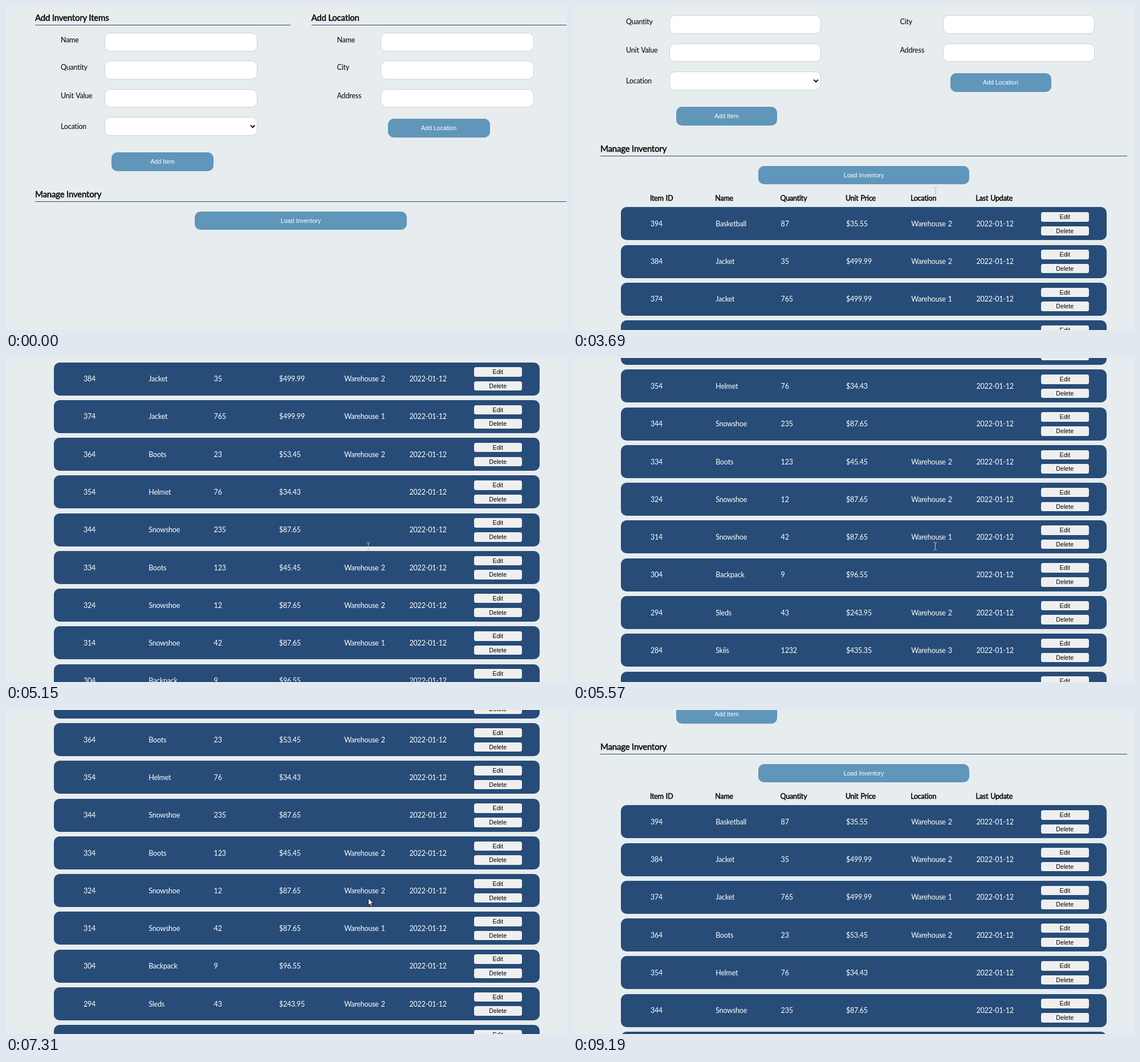
An HTML page that plays this animation: 984x569 px, repeating every 9520 ms.

```html
<!DOCTYPE html>
<html lang="en">
<head>
<meta charset="utf-8">
<title>Inventory</title>
<style>
html, body { margin: 0; width: 100%; height: 100%; overflow: hidden; background: #e7ecef; }
body { position: relative; }
#page { position: absolute; left: 0; top: 0; width: 984px; }
#page div { position: absolute; box-sizing: border-box; white-space: pre; }
.text, .head, .title { font: 12.5px/20px Lato, sans-serif; letter-spacing: -.2px; word-spacing: 1px; height: 20px; color: #000; }
.head, .title { -webkit-text-stroke: .45px #000; }
.title { font-size: 15px; word-spacing: 0; }
.cell { color: #fff; }
.line { height: 1px; background: #274c77; }
.input { background: #fff; border: 1px solid #ccd2d6; border-radius: 10px; }
.button, .small { font: 10.67px "Liberation Sans", Arial, sans-serif; text-align: center; }
.button { background: #6096ba; color: #fff; border-radius: 10px; line-height: 32px; }
.button.hover { background: #6aa5cd; }
.row { background: #274c77; border-radius: 10px; }
.small { background: #efefef; color: #000; border-radius: 3.5px; line-height: 16.5px; }
svg { position: absolute; left: 0; top: 0; overflow: visible; }
</style>
</head>
<body>
<div id="page"></div>
<svg id="cursor" width="1" height="1">
  <path id="arrow" d="M.5 .5V13L3.3 10.4 5.3 15.3 7.4 14.4 5.4 9.7H9.2Z" fill="#fff" stroke="#000" stroke-width=".9"/>
  <path id="beam" d="M-3-6.5H-1L0-5.5 1-6.5H3M0-5.5V5.5M-3 6.5H-1L0 5.5 1 6.5H3" fill="none" stroke="#cbc3ae"/>
  <g id="hand" stroke="#000" stroke-width="1" stroke-linejoin="round">
    <path d="M-1.3 1.4C-1.3-.5 1.3-.5 1.3 1.4V6.2C2-.0 0 5 2.2 5.2 3.6 5.3 3.9 6 3.9 6.9 5 5.8 6.3 6.3 6.3 7.7 7.4 7 8.2 7.6 8.2 8.8V12.5C8.2 14.5 6.7 15.3 6.7 17.5H-.3C-.3 15.3-2 14.2-3.2 12L-4.6 9.5C-5.1 8-3.4 7.6-2.5 8.7L-1.3 10.2Z" fill="#fff"/>
    <path d="M1.3 6V9.5M3.9 7V10M6.3 8V10" fill="none" stroke-width=".7"/>
  </g>
</svg>
<script>
const LOOP = 9520, LOAD_TIME = 2050, STEP = 67;
const $ = id => document.getElementById(id);

const HEADERS = ['Item ID', 'Name', 'Quantity', 'Unit Price', 'Location', 'Last Update'];
// name, quantity, price, warehouse number; ids count down from 394 by ten
const ITEMS = `Basketball 87 35.55 2
Jacket 35 499.99 2
Jacket 765 499.99 1
Boots 23 53.45 2
Helmet 76 34.43
Snowshoe 235 87.65
Boots 123 45.45 2
Snowshoe 12 87.65 2
Snowshoe 42 87.65 1
Backpack 9 96.55
Sleds 43 243.95 2
Skiis 1232 435.35 3
Boots 54 53.45 1
Helmet 31 34.43 2`.split('\n').map(line => line.split(' '));

// Each move: start time, number of steps, ease-out power, target values
const SCROLL = [
  [3290, 4, 1.2, 80],
  [4150, 9, 1, 320],
  [4960, 13, 1.53, 720],
  [6110, 3, 1.2, 746.4],
  [7100, 10, 1.657, 506.4],
  [7900, 7, 1.19, 266.4]
];
const POINTER = [
  [260, 15, 1.2, 778, 369],
  [1260, 3, 1, 690, 354],
  [1460, 6, 1.3, 556, 375],
  [2380, 1, 1, 557, 375],
  [2450, 8, 1.2, 635, 318],
  [3690, 1, 1, 636, 324.5],
  [4150, 1, 1, 636.5, 328],
  [4960, 1, 1, 635.5, 330.5],
  [6110, 1, 1, 635, 330],
  [8590, 10, 1, 953, 572]
];

function follow(moves, values, t) {
  for (const [start, steps, power, ...target] of moves) {
    if (t < start) break;
    const step = Math.min(steps, Math.floor((t - start) / STEP + .25) + 1);
    const p = 1 - (1 - step / steps) ** power;
    values = values.map((v, i) => v + (target[i] - v) * p);
  }
  return values;
}

function box(cls, x, y, w, h, content = '') {
  return `<div class="${cls}" style="left:${x}px;top:${y}px;width:${w}px;height:${h}px">${content}</div>`;
}
function label(cls, x, middle, content) {
  return `<div class="${cls}" style="left:${x}px;top:${middle - 10}px">${content}</div>`;
}

function form(x, title, fields, size) {
  const rows = [[60, 47], [108, 96], [157.5, 145.5], [211.5, 195]];
  return label('title', x, 20, title) + box('line', x, 33, size.line, 1) +
    fields.map((name, i) => label('text', x + 45, rows[i][0], name) +
      box('input', x + size.inputX, rows[i][1], size.input, 32.5)).join('');
}

function table() {
  const columnX = i => 135 + i * 114.3;
  return HEADERS.map((h, i) => label('head', columnX(i), 418, h)).join('') +
    ITEMS.map(([name, quantity, price, place], r) => {
      const y = 433.3 + r * 66.27;
      const cells = [394 - r * 10, name, quantity, '$' + price, place ? 'Warehouse ' + place : '', '2022-01-12'];
      return box('row', 84, y, 852, 58) +
        cells.map((c, i) => label('text cell', columnX(i) + 1, y + 29.6, c)).join('') +
        box('small', 821, y + 8.7, 83.5, 16.5, 'Edit') +
        box('small', 821, y + 33.4, 83.5, 16.5, 'Delete');
    }).join('');
}

// The page gets narrower once the list makes it scroll
function build(loaded) {
  const size = loaded
    ? { x: 48, gap: 480.5, line: 444, inputX: 120.5, input: 266, buttonX: 133, button: 177, loadX: 277, load: 370, full: 924 }
    : { x: 51, gap: 484.5, line: 447.5, inputX: 121.5, input: 268.5, buttonX: 134, button: 179, loadX: 280, load: 372, full: 932 };
  const { x } = size, right = x + size.gap;
  const chevronX = x + size.inputX + size.input - 12;
  $('page').innerHTML =
    form(x, 'Add Inventory Items', ['Name', 'Quantity', 'Unit Value', 'Location'], size) +
    form(right, 'Add Location', ['Name', 'City', 'Address'], size) +
    `<svg width="1" height="1"><path d="M${chevronX} 209.5l3.7 3.7 3.7-3.7" fill="none" stroke="#000" stroke-width="1.8"/></svg>` +
    box('button', x + size.buttonX, 257, size.button, 32.5, 'Add Item') +
    box('button', right + size.buttonX, 198, size.button, 32.5, 'Add Location') +
    label('title', x, 330, 'Manage Inventory') + box('line', x, 343, size.full, 1) +
    box('button load', x + size.loadX, 360.5, size.load, 32.5, 'Load Inventory') +
    (loaded ? table() : '');
}

let shown;
function draw(now) {
  const t = now % LOOP, loaded = t >= LOAD_TIME;
  if (loaded !== shown) build(shown = loaded);

  const [scroll] = follow(SCROLL, [0], t);
  const [x, y] = follow(POINTER, [990, 575], t);
  const hover = scroll === 0 && x > 328 && x < 698 && y > 360 && y < 393;
  const kind = hover ? 'hand' : t >= 3690 && t < 6110 ? 'beam' : 'arrow';

  $('page').style.transform = `translateY(${-Math.round(scroll)}px)`;
  document.querySelector('.load').classList.toggle('hover', hover);
  $('cursor').style.transform = `translate(${x}px,${y}px)`;
  for (const id of ['arrow', 'beam', 'hand']) $(id).style.display = id === kind ? '' : 'none';
}

const origin = performance.now();
function tick() {
  draw(performance.now() - origin);
  requestAnimationFrame(tick);
}
tick();
</script>
</body>
</html>
```
